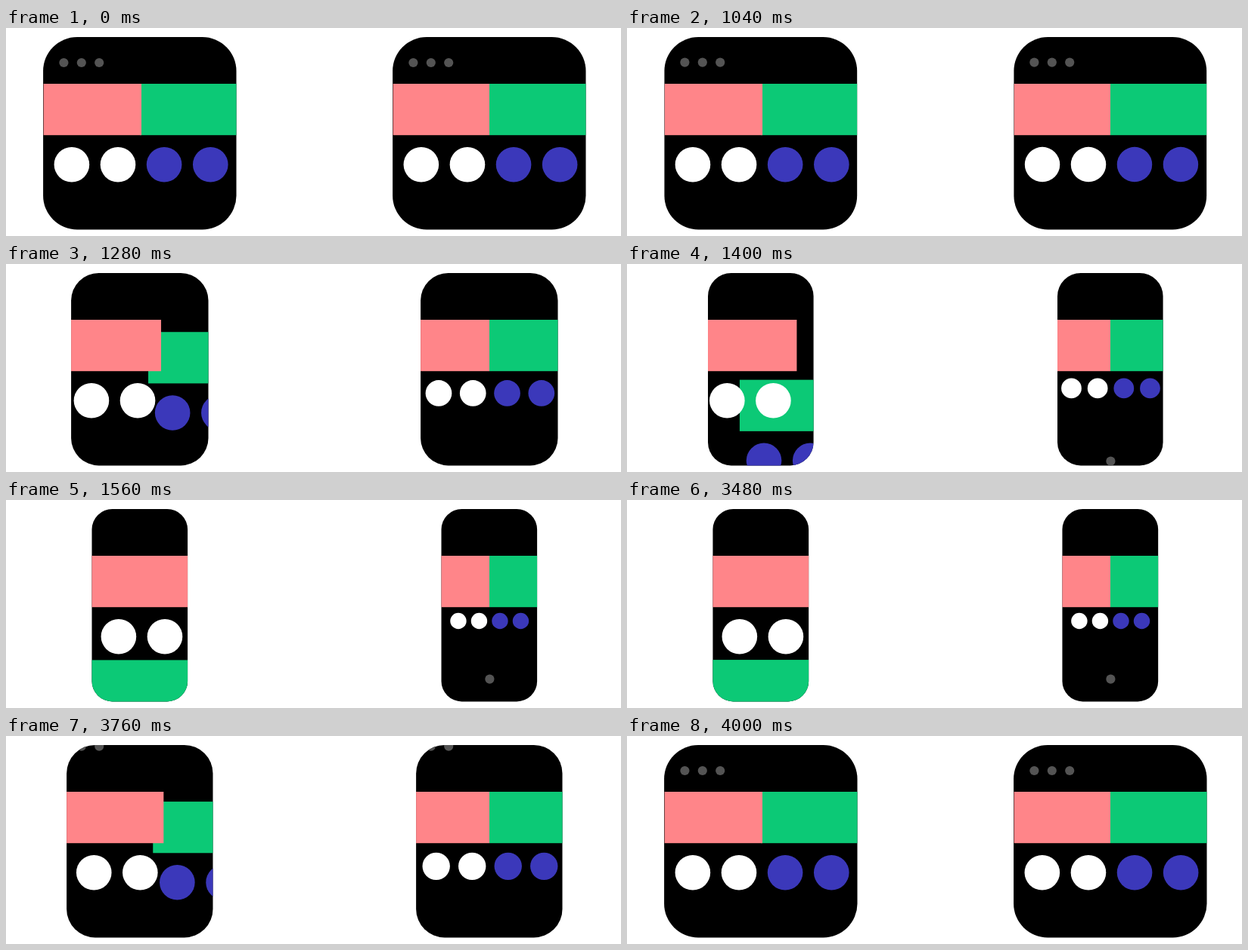
These frames come from a looping animation (813 px wide and 276 px high, 5040 ms). An HTML page with a canvas:

```html
<!DOCTYPE html>
<html lang="en">
<head>
<meta charset="utf-8">
<title>Two layouts resizing</title>
<style>
  html, body { margin: 0; width: 100%; height: 100%; overflow: hidden; background: #fff; }
  canvas { display: block; width: 813px; height: 276px; }
</style>
</head>
<body>
<canvas id="stage" width="813" height="276"></canvas>
<script>
const ctx = document.getElementById('stage').getContext('2d');

const LOOP = 5040, STEP = 40;
const SHRINK = [1040, 1560], GROW = [3480, 4000];
const TOP = 12, HEIGHT = 255.4, BAND_Y = 74, BAND_H = 68.2;
const PINK = '#ff8589', GREEN = '#0cc976', BLUE = '#3b38ba', GREY = '#545454';

// shrink start, shrink duration, grow start, grow duration (ms)
const TIMING = {
  card:    [1020, 473, 3470, 566],
  circles: [1020, 541, 3470, 514],
  dots:    [1020, 473, 3470, 544],
  slide:   [1030, 560, 3470, 560],
  wrap:    [1204, 356, 3470, 358]
};

const lerp = (a, b, p) => a + (b - a) * p;

function ease(x) {
  x = Math.min(1, Math.max(0, x));
  return x * x * (3 - 2 * x);
}

// 0 = wide window, 1 = narrow phone
function progress(name, t) {
  const [s, sd, g, gd] = TIMING[name];
  if (t < SHRINK[0] || t >= GROW[1]) return 0;
  if (t < SHRINK[1]) return ease((t - s) / sd);
  if (t < GROW[0]) return 1;
  return 1 - ease((t - g) / gd);
}

function rect(x, y, w, h, fill) {
  ctx.fillStyle = fill;
  ctx.fillRect(x, y, w, h);
}

function circle(x, y, r, fill) {
  ctx.fillStyle = fill;
  ctx.beginPath();
  ctx.arc(x, y, r, 0, Math.PI * 2);
  ctx.fill();
}

function card(cx, p, drawContent) {
  const w = lerp(255.4, 126.6, p.card);
  ctx.save();
  ctx.beginPath();
  ctx.roundRect(cx - w / 2, TOP, w, HEIGHT, lerp(45, 27, p.circles));
  ctx.fillStyle = '#000';
  ctx.fill();
  ctx.clip();
  for (let i = -1; i <= 1; i++) {
    circle(cx - 77 + i * 23.4, 46 - 72 * p.dots, 6.1, GREY);
  }
  drawContent(p);
  ctx.restore();
}

// Fixed-size content: the second half wraps below the first
function wrapping(p) {
  const dx = 62 * p.slide;
  const gx = dx - 127.7 * p.wrap, gy = 138.4 * p.wrap;
  rect(177 + gx, BAND_Y + gy, 130, BAND_H, GREEN);
  circle(209.1 + gx, 181.2 + gy, 23.3, BLUE);
  circle(270.3 + gx, 181.2 + gy, 23.3, BLUE);
  rect(49.6 + dx, BAND_Y, 129.4, BAND_H, PINK);
  circle(86.9 + dx, 181.2, 23.3, '#fff');
  circle(148 + dx, 181.2, 23.3, '#fff');
}

// Content that scales with the card
function scaling(p) {
  const q = p.circles;
  rect(511.6, BAND_Y, 127.4, BAND_H, PINK);
  rect(639, BAND_Y, 128, BAND_H, GREEN);
  for (let i = 0; i < 4; i++) {
    const x = lerp(640.5, 639.2, q) + (i - 1.5) * lerp(61.1, 27.5, q);
    circle(x, lerp(181.2, 160.5, q), lerp(23.3, 10.7, q), i < 2 ? '#fff' : BLUE);
  }
  circle(639.4, 237.6 + 90 * (1 - p.slide), 6.1, GREY);
}

function draw(now) {
  const t = Math.floor((now % LOOP) / STEP) * STEP;
  const p = {};
  for (const name in TIMING) p[name] = progress(name, t);
  rect(0, 0, 813, 276, '#fff');
  card(176.8, p, wrapping);
  card(638.8, p, scaling);
}

function frame() {
  draw(performance.now());
  requestAnimationFrame(frame);
}
frame();
</script>
</body>
</html>
```
